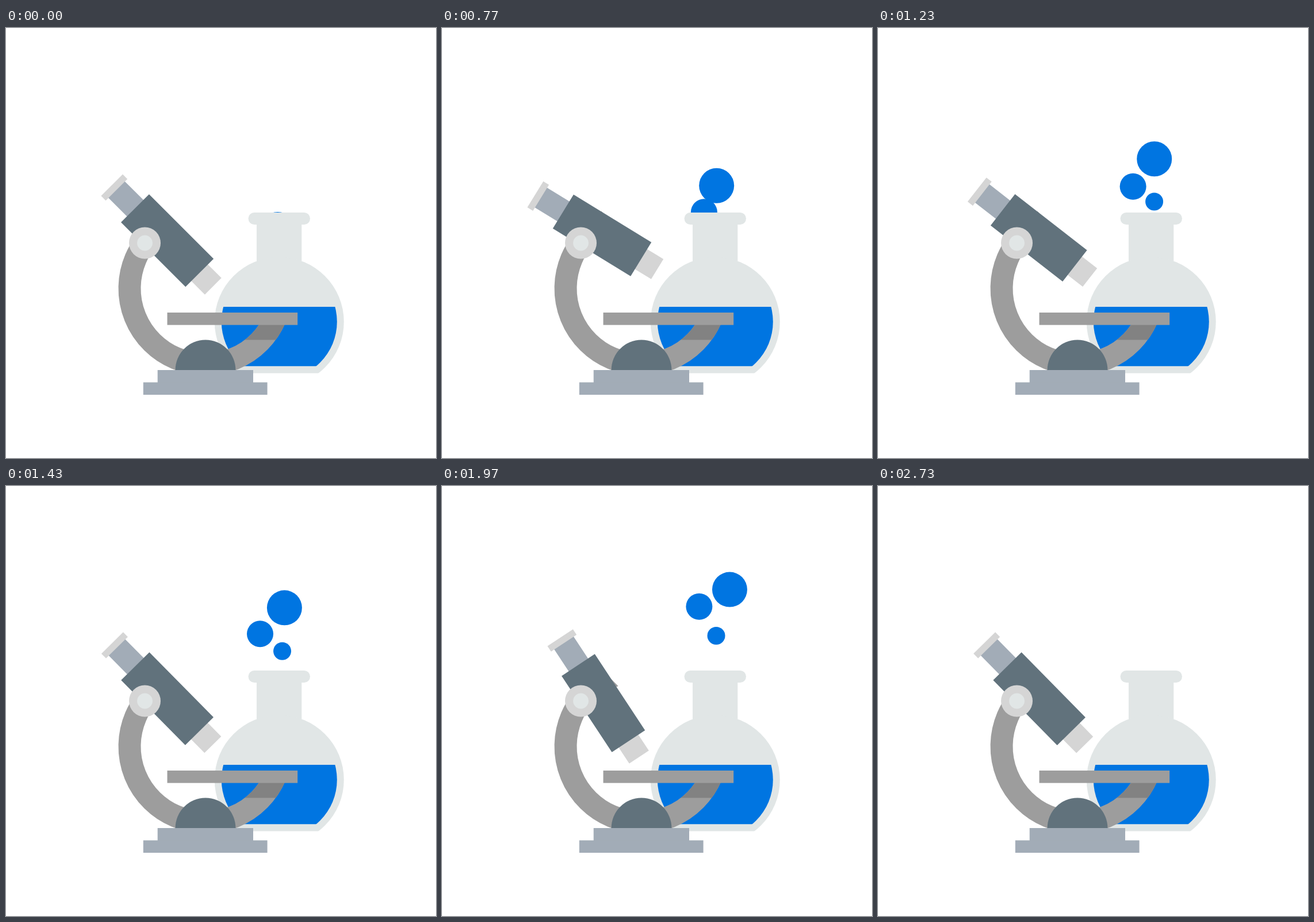
Recreate the animation shown at these times as an HTML page with a canvas. Size 748 by 748 pixels, loop 2760 ms.

```html
<!DOCTYPE html>
<html lang="en">
<head>
<meta charset="utf-8">
<title>Laboratory</title>
<style>
  html, body { margin: 0; width: 100%; height: 100%; overflow: hidden; background: #fff; }
  canvas { display: block; }
</style>
</head>
<body>
<canvas id="stage" width="748" height="748"></canvas>
<script>
const ctx = document.getElementById('stage').getContext('2d');
const SIZE = 748, LOOP = 2760, TAU = Math.PI * 2;
const C = {
  blue: '#0075e1', glass: '#e1e6e6', steel: '#61727c', slate: '#a2acb7',
  silver: '#d5d5d5', grey: '#9d9d9d', shade: '#828282'
};
const PIVOT = { x: 241.5, y: 374 };

// keys: [tick, value, value, ...], linear in between
const TILT = [[0, 45], [29, 28], [54, 59], [83, 45]];
const BUBBLES = [
  { r: 30.5, keys: [[0, 472.6, 350.5], [40, 481.4, 217.8], [74, 515.5, 150.3]] },
  { r: 23, keys: [[0, 476, 393.3], [40, 441, 266.2], [74, 452.4, 165.2]] },
  { r: 15.5, keys: [[0, 473, 423], [40, 481.2, 292.2], [74, 473.7, 235.5]] }
];
const LAST_BUBBLE = 74;

function at(keys, n) {
  let i = 1;
  while (i < keys.length - 1 && n > keys[i][0]) i++;
  const a = keys[i - 1], b = keys[i];
  const k = (n - a[0]) / (b[0] - a[0]);
  return a.slice(1).map((v, j) => v + (b[j + 1] - v) * k);
}

// 30 ticks per second, rounded to steps of 10 ms
function tick(ms) {
  const rest = ms % 100;
  return 3 * Math.floor(ms / 100) + (rest >= 70 ? 2 : rest >= 30 ? 1 : 0);
}

function box(color, x1, y1, x2, y2) {
  ctx.fillStyle = color;
  ctx.fillRect(x1, y1, x2 - x1, y2 - y1);
}

function disc(color, x, y, r) {
  ctx.fillStyle = color;
  ctx.beginPath();
  ctx.arc(x, y, r, 0, TAU);
  ctx.fill();
}

function clipped(trace, draw) {
  ctx.save();
  ctx.beginPath();
  trace();
  ctx.clip();
  draw();
  ctx.restore();
}

function flask() {
  ctx.fillStyle = C.glass;
  ctx.beginPath();
  ctx.roundRect(421.5, 321, 107.5, 21, 10.5);
  ctx.fill();
  box(C.glass, 436, 335, 514.3, 420);
  clipped(() => ctx.rect(0, 390, SIZE, 210.6), () => disc(C.glass, 475.3, 511, 112.5));
  clipped(() => ctx.rect(0, 485, SIZE, 103.2), () => disc(C.blue, 475.3, 511, 100.5));
}

function ring(color) {
  ctx.strokeStyle = color;
  ctx.lineWidth = 39;
  ctx.beginPath();
  ctx.arc(347, 453, 132, 0.4, 4.6);
  ctx.stroke();
}

function arm() {
  const edge = [[0, 41.5], [400, 441.5], [SIZE, 441.5], [SIZE, SIZE], [0, SIZE]];
  clipped(() => edge.forEach(p => ctx.lineTo(...p)), () => ring(C.grey));
  clipped(() => ctx.rect(400, 510, 120, 32.6), () => ring(C.shade));
  box(C.grey, 280.5, 495, 507.2, 516.6);
}

function base() {
  clipped(() => ctx.rect(0, 500, SIZE, 95), () => disc(C.steel, 347, 595, 52.4));
  box(C.slate, 263.7, 595, 430, 617);
  box(C.slate, 238.8, 616.4, 454.6, 638);
}

function tube(deg) {
  ctx.save();
  ctx.translate(PIVOT.x, PIVOT.y);
  ctx.rotate(deg * Math.PI / 180);
  box(C.slate, -101, -51.2, -54, -10.8);
  box(C.silver, -111.7, -57.3, -100.2, -4.1);
  box(C.silver, 103, -51.2, 137.2, -10.4);
  box(C.steel, -54.8, -65.2, 104, 3.9);
  ctx.restore();
}

function draw(ms) {
  const n = tick(ms);
  box('#fff', 0, 0, SIZE, SIZE);
  if (n <= LAST_BUBBLE) {
    for (const b of BUBBLES) disc(C.blue, ...at(b.keys, n), b.r);
  }
  flask();
  arm();
  base();
  tube(at(TILT, n)[0]);
  disc(C.silver, PIVOT.x, PIVOT.y, 27.5);
  disc(C.glass, PIVOT.x, PIVOT.y, 13.4);
}

const start = performance.now();
function loop() {
  draw((performance.now() - start) % LOOP);
  requestAnimationFrame(loop);
}
loop();
</script>
</body>
</html>
```
